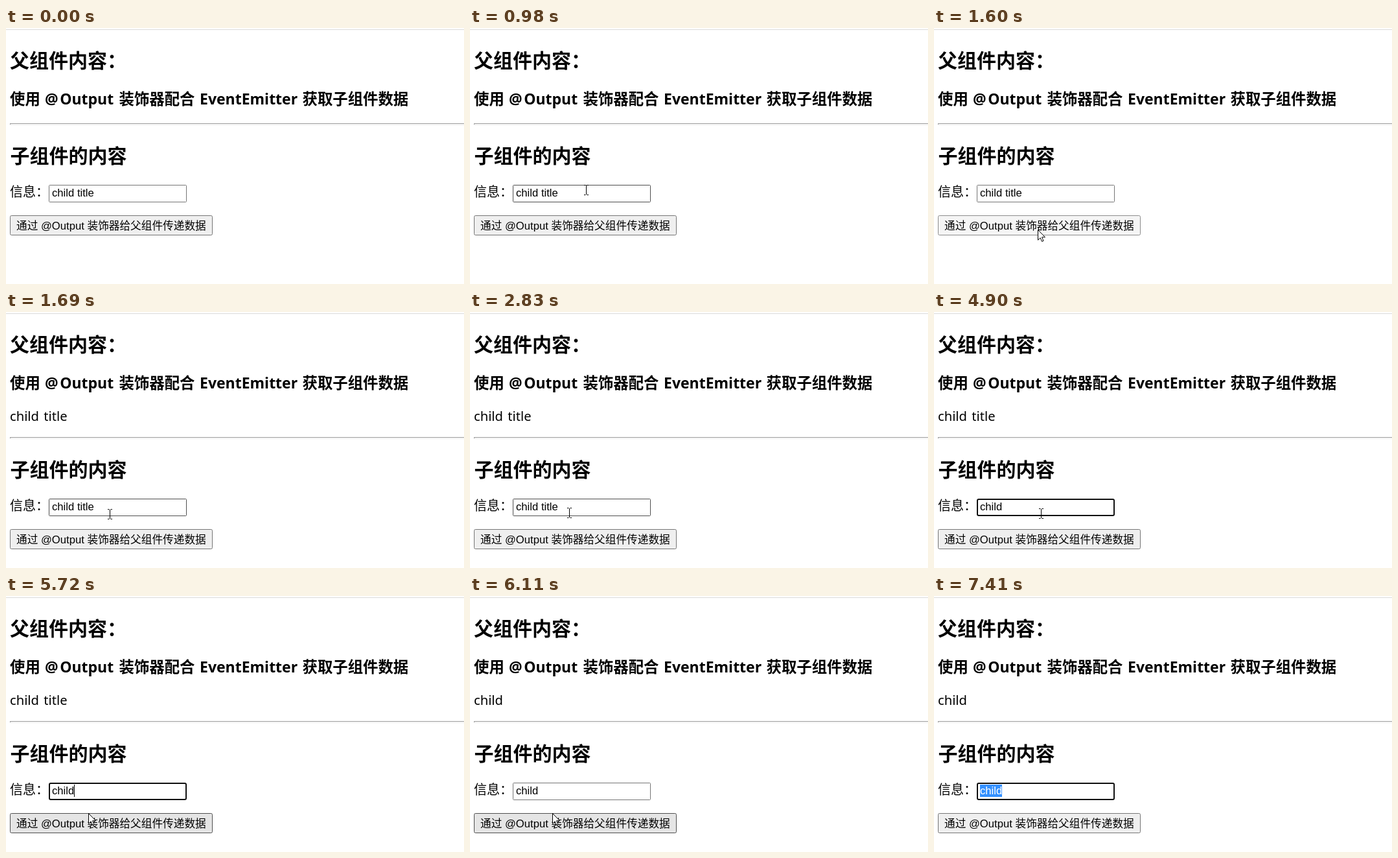
Write an HTML page that moves like this. It is 707 by 395 pixels and loops after 8 s.

```html
<!DOCTYPE html>
<html lang="zh-CN">
<head>
<meta charset="utf-8">
<title>Output / EventEmitter</title>
<style>
  html, body { margin: 0; width: 100%; height: 100%; overflow: hidden; background: #fff; }
  svg { display: block; width: 100vw; height: 100vh; }
  text { white-space: pre; font: 20px "Noto Sans", "Noto Sans CJK SC", "Noto Sans CJK", sans-serif; }
  .cjk { font-family: "Noto Sans CJK SC", "Noto Sans CJK", sans-serif; }
  .h2 { font-size: 30px; font-weight: 700; }
  .h3 { font-size: 23.4px; font-weight: 700; }
  .latin { font-family: "Noto Sans", sans-serif; font-size: 23px; }
  .control { font: 16.6667px "Liberation Sans", "Noto Sans CJK SC", "Noto Sans CJK", sans-serif; }
  #message { font-size: 20.2px; word-spacing: 2px; }
</style>
</head>
<body>
<svg viewBox="0 0 707 395">
  <rect y="2" width="707" height="1" fill="#dadada"/>
  <text class="cjk h2" x="6" y="61">父组件内容：</text>
  <text class="cjk h3" y="118"><tspan x="6">使用</tspan><tspan class="latin" x="60">@</tspan><tspan class="latin" dx="2.5">Output</tspan><tspan x="174.5">装饰器配合</tspan><tspan class="latin" x="299">EventEmitter</tspan><tspan x="457.5">获取子组件数据</tspan></text>
  <text id="message" x="6" y="168"></text>

  <g id="child">
    <path d="M6 147.5H707M6.5 147V149" stroke="#9a9a9a"/>
    <path d="M6 149.5H707" stroke="#eee"/>
    <text class="cjk h2" x="6.5" y="207.5">子组件的内容</text>
    <text class="cjk" x="6" y="259.5">信息：</text>
    <rect id="field" fill="#fff"/>
    <rect id="selection" y="245" height="19" fill="#3390ff"/>
    <text id="value" class="control" x="71" y="260"></text>
    <rect id="caret" y="245" width="1" height="19"/>
    <rect id="button" x="6.5" y="289.5" width="312" height="30" rx="2"/>
    <text class="control" x="16" y="311">通过 @Output 装饰器给父组件传递数据</text>
  </g>

  <path id="arrow" d="M.5 .5V16.2L4.1 12.8L6.6 18.4L9 17.4L6.6 11.8H11.5Z" fill="#fff" stroke="#000"/>
  <path id="beam" d="M-3.5 -7.5H-1M1 -7.5H3.5M0 -7V7M-3.5 7.5H-1M1 7.5H3.5" fill="none" stroke="#000"/>
</svg>
<script>
const LOOP = 8000;
const SAMPLE = 80;  // the pointer is seen at this interval
const BLINK = 540;
const TEXT_X = 71;
const INITIAL = "child title";

const enter = 260, leave = 7410;
const firstClick = 1600, secondClick = 5870, clickTime = 90;
const focusTime = 3250, dragStart = 7160;
const deletions = [4100, 4350, 4430, 4510, 4820, 5490];

const moves = [
  { from: enter, to: 510, x: 439, y: 230 },
  { from: 740, to: 1130, x: 163, y: 250 },
  { from: 1370, to: 1440, x: 160, y: 311 },
  { from: 2110, to: 2390, x: 168, y: 211 },
  { from: 2390, to: 2670, x: 153, y: 309 },
  { from: 2830, to: 3020, x: 193, y: 302 },
  { from: 4350, to: 4510, x: 165, y: 310 },
  { from: 5560, to: 5720, x: 127, y: 335 },
  { from: 6990, to: 7070, x: 105, y: 302 },
  { from: dragStart, to: leave, x: TEXT_X, y: 302 }
];

const $ = id => document.getElementById(id);
const set = (id, attrs) => {
  for (const name in attrs) $(id).setAttribute(name, attrs[name]);
};
const show = (id, visible) => set(id, { visibility: visible ? "visible" : "hidden" });
const within = (v, from, to) => v >= from && v < to;
const easeOut = p => 1 - (1 - p) ** 3;

function pointerAt(t) {
  let x = 250, y = 366;
  for (const move of moves) {
    if (t < move.from) break;
    const elapsed = Math.floor((t - move.from) / SAMPLE) * SAMPLE;
    const p = t >= move.to ? 1 : easeOut(elapsed / (move.to - move.from));
    x += (move.x - x) * p;
    y += (move.y - y) * p;
  }
  return { x: Math.round(x), y: Math.round(y) };
}

function draw(t) {
  const sent = t >= firstClick + clickTime;
  const resent = t >= secondClick + clickTime;
  const shift = sent ? 46 : 0;
  const { x, y } = pointerAt(t);
  const visible = within(t, enter, leave);
  const overField = visible && within(x, 66, 279) && within(y, 242 + shift, 269 + shift);
  const overButton = visible && within(x, 6, 319) && within(y, 289 + shift, 320 + shift);
  const pressed = [firstClick, secondClick].some(click => within(t, click, click + clickTime));
  const typing = within(t, focusTime, secondClick);
  const dragging = t >= dragStart;

  set("child", { transform: `translate(0 ${shift})` });
  const deleted = deletions.filter(time => time <= t).length;
  const value = INITIAL.slice(0, INITIAL.length - deleted);
  $("value").textContent = value;
  $("message").textContent = resent ? value : sent ? INITIAL : "";

  set("field", typing || dragging
    ? { x: 67, y: 243, width: 211, height: 25, rx: 2, stroke: "#101010", "stroke-width": 2 }
    : { x: 66.5, y: 242.5, width: 212, height: 26, rx: 1, stroke: overField ? "#4f4f4f" : "#767676", "stroke-width": 1 });
  set("button", {
    fill: pressed ? "#f5f5f5" : overButton ? "#e5e5e5" : "#efefef",
    stroke: pressed ? "#8d8d8d" : overButton ? "#4f4f4f" : "#767676"
  });

  const textWidth = $("value").getComputedTextLength();
  const textEnd = Math.floor(TEXT_X + textWidth);
  const selected = dragging ? Math.max(0, textEnd - x) : 0;
  set("selection", { x: textEnd - selected, width: selected });
  set("value", { fill: selected > textWidth / 2 ? "#fff" : "#000" });
  set("caret", { x: textEnd });
  show("caret", typing && Math.floor((t - focusTime) / BLINK) % 2 === 0);

  show("beam", overField);
  show("arrow", visible && !overField);
  set("beam", { transform: `translate(${x + 0.5} ${y + 1})` });
  set("arrow", { transform: `translate(${x} ${y})` });
}

const start = performance.now();
function tick() {
  draw((performance.now() - start) % LOOP);
  requestAnimationFrame(tick);
}
tick();
</script>
</body>
</html>
```
